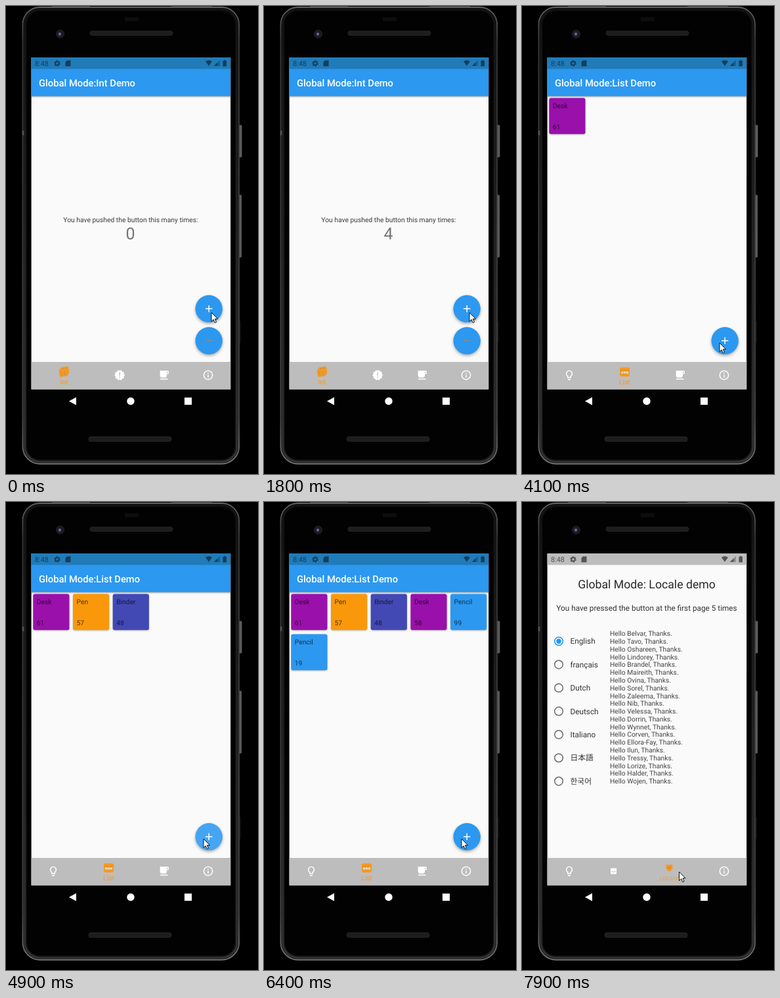
An HTML page for the animation above (8 s loop, 384x710 px).

```html
<!DOCTYPE html>
<html lang="en">
<head>
<meta charset="utf-8">
<title>Global Mode demo</title>
<style>
  html, body { margin: 0; width: 100%; height: 100%; overflow: hidden; background: #000; }
  svg { display: block; width: 384px; height: 710px; font: 10.32px Roboto, "Noto Sans CJK KR", "Noto Sans CJK JP", "Noto Sans CJK", sans-serif; }
  text { white-space: pre; text-rendering: geometricPrecision; }
  .mid { text-anchor: middle; }
  .bar { font-size: 14.74px; font-weight: 500; fill: #fff; }
  .body { font-size: 11.79px; fill: #333; }
  .tile { filter: drop-shadow(0 1px 1px #0004); }
  .fab { filter: drop-shadow(0 2px 2px #0005); }
</style>
</head>
<body>
<svg viewBox="0 0 384 710">
  <defs>
    <linearGradient id="edge" x2="0" y2="1">
      <stop offset="0" stop-color="#777"/><stop offset=".08" stop-color="#404040"/>
      <stop offset=".9" stop-color="#4c4c4c"/><stop offset="1" stop-color="#858585"/>
    </linearGradient>
    <linearGradient id="rim" x2="0" y2="1">
      <stop offset="0" stop-color="#161616"/><stop offset="1" stop-color="#383838"/>
    </linearGradient>
    <clipPath id="screen"><rect x="38.600" y="78" width="303.600" height="503.600"/></clipPath>
  </defs>

  <g id="phone">
    <path d="M70 .5H128M252 .5H314" stroke="#333"/>
    <g fill="#585858" stroke="#858585" stroke-width=".6">
      <rect x="355" y="181" width="4" height="48" rx="1"/>
      <rect x="354.500" y="287" width="4" height="94" rx="1"/>
    </g>
    <path d="M357 478V511" stroke="#222"/>
    <rect x="25.500" y="2" width="329.500" height="692.500" rx="26" fill="#020202" stroke="url(#edge)" stroke-width="1.800"/>
    <rect x="28.500" y="5" width="323.500" height="686.500" rx="23" fill="none" stroke="url(#rim)" stroke-width="4" style="filter:blur(1.2px)"/>
    <path d="M26 189V196" stroke="#555" stroke-width="2.500"/>
    <path d="M181 20H202" stroke="#0d0d0d" stroke-width="6"/>
    <rect x="128" y="38" width="126" height="6.500" rx="3" fill="#1d1d1d" stroke="#252525"/>
    <rect x="126" y="653.500" width="126" height="7" rx="3" fill="#1d1d1d" stroke="#252525"/>
    <circle cx="82.500" cy="42.500" r="6" fill="#191920" stroke="#262626"/>
    <circle cx="82" cy="42.500" r="2.200" fill="#61679a"/>
    <g fill="#fff">
      <path d="M96 599.500L107 593.500V605.500Z"/>
      <circle cx="190" cy="599.500" r="5.700"/>
      <rect x="272" y="594" width="11" height="11"/>
    </g>
  </g>

  <g clip-path="url(#screen)">
    <rect x="38" y="78" width="305" height="504" fill="#fafafa"/>
    <g id="appbar">
      <rect x="38" y="95" width="305" height="41.700" fill="#2c98f0" style="filter:drop-shadow(0 1px 1px #0006)"/>
      <text id="title" class="bar" x="50" y="122"></text>
    </g>
    <rect id="statusbar" x="38" y="78" width="305" height="17.500"/>
    <g id="status">
      <text x="44" y="90.500" style="font-size:10.800px">8:48</text>
      <circle cx="78" cy="87" r="2.700" fill="none" stroke="currentColor" stroke-width="2"/>
      <circle cx="78" cy="87" r="4.200" fill="none" stroke="currentColor" stroke-width="1.300" stroke-dasharray="2.200"/>
      <path d="M93 82.500H98.500V91.500H90.500V85Z"/>
      <path d="M304 84Q309 80.500 314 84L309 91Z"/>
      <path d="M317 91L326 82V91Z" fill-opacity=".45"/><path d="M317 91L322.500 85.500V91Z"/>
      <path d="M330.500 83H332V82H334.500V83H336V91.500H330.500Z"/>
    </g>

    <g id="intPage">
      <text class="mid" x="190" y="327.500" fill="#3a3a3a">You have pushed the button this many times:</text>
      <text class="mid" id="count" x="189.500" y="353.500" style="font-size:25.060px" fill="#757575"></text>
    </g>
    <g id="listPage"></g>
    <g id="localePage" fill="#444">
      <text class="mid" x="190" y="131" style="font-size:17.690px" fill="#2a2a2a">Global Mode: Locale demo</text>
      <text class="mid body" x="190" y="165">You have pressed the button at the first page 5 times</text>
    </g>

    <g id="fabs"></g>
    <rect x="38" y="540" width="305" height="42" fill="#bdbdbd"/>
    <g id="nav"></g>
  </g>
  <path id="cursor" d="M0 0V13.500L3.200 10.600L5.300 15.500L7.500 14.500L5.400 9.800H9.600Z" fill="#fff" stroke="#111"/>
</svg>

<script>
const LOOP = 8000, LIST_AT = 3000, LOCALE_AT = 7700, MORPH = 320;
const ORANGE = '#f8981d', BLUE = '#2c98f0', PURPLE = '#9a10ab', INDIGO = '#4349b4', GREEN = '#4ebc54';
const pushes = [500, 800, 1100, 1600, 2000];
const tiles = [
  [3800, 'Desk', 61, PURPLE], [4500, 'Pen', 57, '#f9980a'], [4800, 'Binder', 48, INDIGO],
  [5150, 'Desk', 58, PURPLE], [5700, 'Pencil', 99, BLUE], [6100, 'Pencil', 19, BLUE],
  [6500, 'Pencil', 70, '#f9980a'], [6800, 'Pen Set', 28, GREEN]
];
const languages = ['English', 'français', 'Dutch', 'Deutsch', 'Italiano', '日本語', '한국어'];
const people = ['Belvar', 'Tavo', 'Oshareen', 'Lindorey', 'Brandel', 'Maireith', 'Ovina', 'Sorel', 'Zaleema', 'Nib',
  'Velessa', 'Dorrin', 'Wynnet', 'Corven', 'Ellora-Fay', 'Ilun', 'Tressy', 'Lorize', 'Halder', 'Wojen'];
// time, x, y
const cursorPath = [[0, 313, 465], [2200, 313, 465], [2450, 308, 490], [2700, 184, 557], [3200, 184, 557],
  [3600, 301, 511], [7150, 301, 511], [7550, 239.5, 561]];

// Shapes on a 24-unit grid
const icons = {
  die: `<g transform="rotate(-8 12 12)"><path d="M7 1H21Q23 1 23 3V16L18 22H3Q1 22 1 20V7Z"/>
    <path d="M2 8H17V21M17 8L22 3" stroke="#d3a25c" stroke-width="1.300" fill="none"/>
    <path d="M5 12h2m5 0h2M5 17h2m5 0h2M9 4.500h2m4 0h2" stroke="#b98a48" stroke-width="2"/></g>`,
  badge: '<path d="M23 12l-2.440-2.780.340-3.680-3.610-.820-1.890-3.180L12 3 8.600 1.540 6.710 4.720l-3.610.810.340 3.680L1 12l2.440 2.780-.340 3.690 3.610.820 1.890 3.180L12 21l3.400 1.460 1.890-3.180 3.610-.820-.340-3.680zM13 17h-2v-2h2zm0-4h-2V7h2z" fill-rule="evenodd"/>',
  blob: '<circle cx="12" cy="12" r="11"/>',
  cup: '<path d="M20 3H4v10c0 2.210 1.790 4 4 4h6c2.210 0 4-1.790 4-4v-3h2c1.110 0 2-.890 2-2V5c0-1.110-.890-2-2-2zm0 5h-2V5h2zM4 19h16v2H4z" fill-rule="evenodd"/>',
  info: '<circle cx="12" cy="12" r="9" fill="none" stroke="currentColor" stroke-width="2"/><path d="M11 11h2v6h-2zm0-4h2v2h-2z"/>',
  bulb: '<path d="M9 17v-2.800a6 6 0 1 1 6 0V17Z" fill="none" stroke="currentColor" stroke-width="2"/><path d="M9 20h6v1q0 1-1 1h-4q-1 0-1-1z"/>',
  pages: '<path d="M8 4H20V16H8ZM4.500 8V19.500H16" fill="none" stroke="currentColor" stroke-width="1.800"/><path d="M10 7h8v2h-8zm0 4h6v2h-6z"/>',
  card: '<rect x="1" y="2" width="22" height="20" rx="3.500"/><path d="M3 8.500H21" stroke="#c08a42"/><path d="M4 13.500h4.500m1 0h4.500m1 0h5" stroke="#e6dccb" stroke-width="4.500"/>',
  tray: '<rect x="3" y="3" width="18" height="18" rx="2"/><path d="M6 13H9Q12 18 15 13H18" fill="none" stroke="#bdbdbd" stroke-width="2"/>',
  shield: '<path d="M3 3H21V13Q20 19 12 22Q4 19 3 13Z"/><path d="M8 10l4 4 4-5" fill="none" stroke="#b98440" stroke-width="2"/>'
};

const $ = id => document.getElementById(id);
const show = (node, on) => node.style.display = on ? '' : 'none';
const icon = (name, x, y, size, color) =>
  `<g transform="translate(${x - size / 2} ${y - size / 2}) scale(${size / 24})" fill="${color}" color="${color}">${icons[name]}</g>`;

$('listPage').innerHTML = tiles.map(([, name, amount, color], i) => {
  const x = 41.3 + i % 5 * 60.7, y = 139.5 + Math.floor(i / 5) * 61;
  return `<g><rect class="tile" x="${x}" y="${y}" width="55.200" height="54.700" rx="3" fill="${color}"/>
    <text x="${x + 5.5}" y="${y + 15}" fill="#000a">${name}</text><text x="${x + 5.5}" y="${y + 47.5}" fill="#000a">${amount}</text></g>`;
}).join('');

$('localePage').innerHTML += languages.map((name, i) => {
  const y = 211.2 + i * 35.4, color = i ? '#6b6b6b' : '#2196f3';
  return `<circle cx="56" cy="${y}" r="6.300" fill="none" stroke="${color}" stroke-width="1.500"/>
    ${i ? '' : `<circle cx="56" cy="${y}" r="3.700" fill="${color}"/>`}<text class="body" x="73.500" y="${y + 4.2}">${name}</text>`;
}).join('') + people.map((name, i) => `<text x="134" y="${203.2 + i * 11.79}">Hello ${name}, Thanks.</text>`).join('');

const fab = (id, y, sign, color) => `<g id="${id}"><circle class="fab" cx="309.200" cy="${y}" r="20.700" fill="${BLUE}"/>
  <circle class="ripple" cx="309.200" cy="${y}" fill="#fff"/>
  <path d="M304 ${y}H314.400${sign === '+' ? `M309.200 ${y - 5.2}V${y + 5.2}` : ''}" stroke="${color}" stroke-width="1.500"/></g>`;
$('fabs').innerHTML = fab('plus', 459.3, '+', '#fff') + fab('minus', 507.8, '-', '#998578') + fab('add', 507.8, '+', '#fff');

function ripple(id, clicks, t) {
  const age = (t - (clicks.filter(c => c <= t).pop() ?? -LOOP)) / 300;
  const circle = $(id).querySelector('.ripple');
  circle.setAttribute('r', 20.7 * Math.min(1, .55 + age * 2));
  circle.setAttribute('opacity', .12 * Math.max(0, 1 - Math.max(0, age - .35) / .35));
}

function cursorAt(t) {
  const next = cursorPath.findIndex(p => p[0] > t);
  if (next < 0) return cursorPath.at(-1).slice(1);
  const [t0, x0, y0] = cursorPath[next - 1], [t1, x1, y1] = cursorPath[next];
  const u = (t - t0) / (t1 - t0), e = u * u * (3 - 2 * u);
  return [x0 + (x1 - x0) * e, y0 + (y1 - y0) * e];
}

function navigation(t, page) {
  const listMorph = t < LIST_AT + MORPH;
  const looks = [
    page === 0 ? ['die', 16.5] : listMorph ? ['pages', 13.5] : ['bulb', 17.7],
    page === 0 ? ['badge', 17.7] : page === 2 ? ['tray', 12] : listMorph ? ['blob', 13] : ['card', 16.5],
    page === 2 ? ['shield', 13] : ['cup', 17.7],
    ['info', 17.7]
  ];
  const labels = ['Int', 'List', 'LOCALE'];
  return looks.map(([name, size], i) => {
    if (i === page) {
      const x = 88.5 + 68 * i, morphing = page === 1 && listMorph || page === 2;
      return icon(name, x, 555, size, ORANGE) +
        `<text class="mid" x="${x}" y="573.500" fill="${ORANGE}" opacity="${morphing ? .7 : 1}"${i === 2 ? ' style="font-size:8.200px"' : ''}>${labels[i]}</text>`;
    }
    return icon(name, i < page ? 72 + 67.5 * i : 308 - 67.4 * (3 - i), 560, size, '#fff');
  }).join('');
}

let navKey;
function draw(t) {
  const page = t < LIST_AT ? 0 : t < LOCALE_AT ? 1 : 2;
  ['intPage', 'listPage', 'localePage'].forEach((id, i) => show($(id), i === page));
  show($('appbar'), page < 2);
  show($('plus'), page === 0);
  show($('minus'), page === 0);
  show($('add'), page === 1);
  $('title').textContent = `Global Mode:${page ? 'List' : 'Int'} Demo`;
  $('statusbar').setAttribute('fill', page < 2 ? '#217bb9' : '#bdbdbd');
  const tint = page < 2 ? '#153f5c' : '#555';
  $('status').setAttribute('fill', tint);
  $('status').setAttribute('color', tint);
  $('count').textContent = pushes.filter(c => c <= t).length;
  [...$('listPage').children].forEach((tile, i) => show(tile, t >= tiles[i][0]));
  ripple('plus', pushes, t);
  ripple('add', tiles.map(tile => tile[0]), t);

  const key = page + (t < LIST_AT + MORPH ? 'a' : 'b');
  if (key !== navKey) $('nav').innerHTML = navigation(t, page);
  navKey = key;
  $('cursor').setAttribute('transform', `translate(${cursorAt(t)})`);
}

function frame() {
  draw(performance.now() % LOOP);
  requestAnimationFrame(frame);
}
frame();
</script>
</body>
</html>
```
